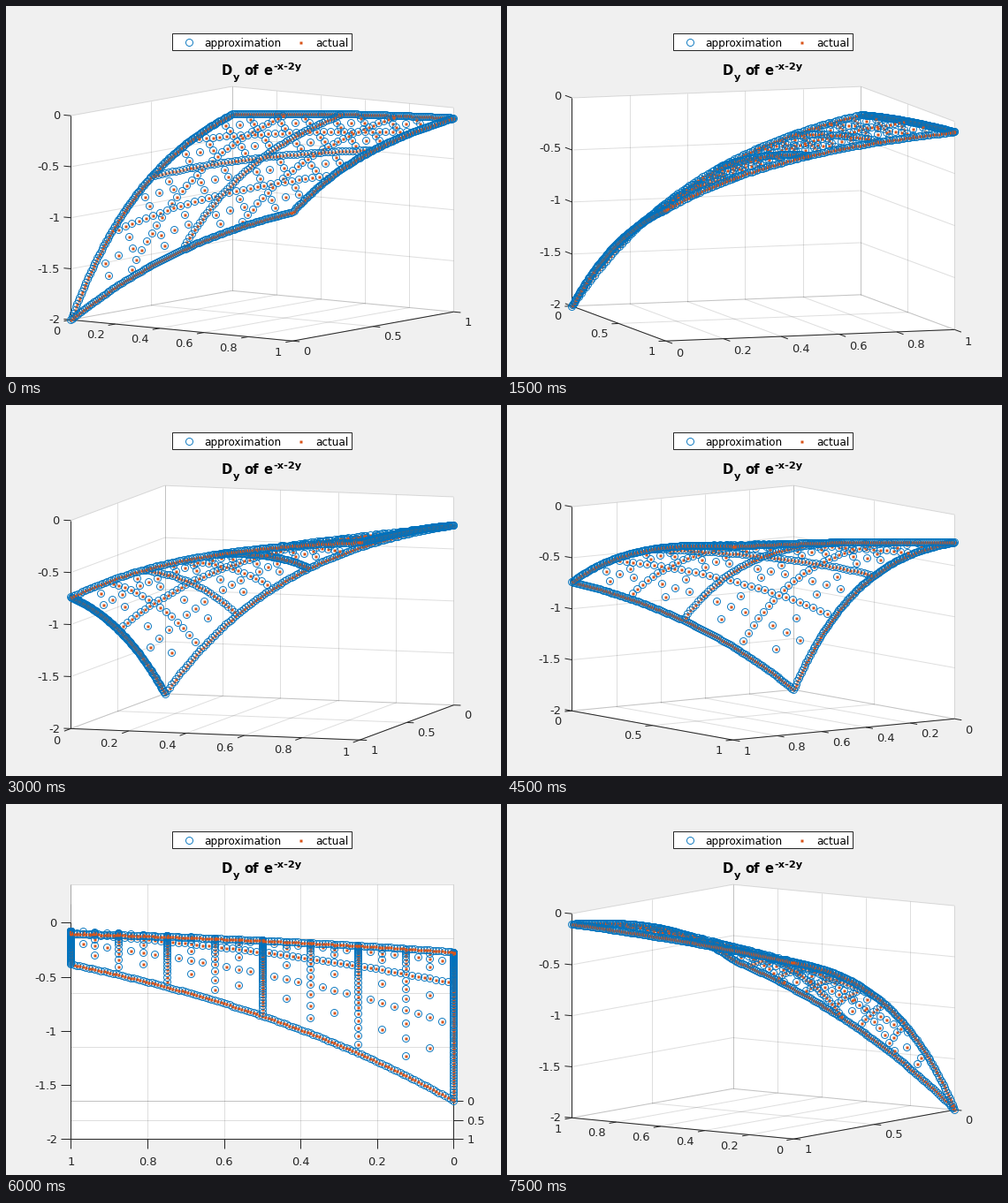
A matplotlib script for the animation above (8 s loop, 560x420 px).

```python
import numpy as np
import matplotlib.pyplot as plt
from matplotlib.animation import FuncAnimation
from matplotlib.collections import LineCollection
from matplotlib.patches import Polygon, Rectangle
from matplotlib.path import Path

W, H, DPI = 560, 420, 100
PX = 72 / DPI                       # points per pixel
BLUE, ORANGE, INK = "#0072BD", "#D95319", "#262626"
LEFT, RIGHT, TOP, BOTTOM = 73.35, 506.4, 91.2, 379.2
ELEV = np.radians(10)
TURN = 36                           # degrees per view
LEVEL = 7                           # sparse grid level
CORNERS = np.array([(0, 0), (1, 0), (1, 1), (0, 1)], float)
RING = Path.circle((0, 0), 4)
DOT = Path([(-1.5, -1.5), (1.5, -1.5), (1.5, 1.5), (-1.5, 1.5), (-1.5, -1.5)])

plt.rcParams["font.family"] = "DejaVu Sans"
fig = plt.figure(figsize=(W / DPI, H / DPI), dpi=DPI, facecolor="#F0F0F0")
ax = fig.add_axes([0, 0, 1, 1])


def sparse_grid(level):
    """Union of dyadic grids whose two levels add up to `level`."""
    pts = set()
    for a in range(level + 1):
        nx, ny = 2 ** a, 2 ** (level - a)
        pts |= {(i / nx, j / ny) for i in range(nx + 1) for j in range(ny + 1)}
    return np.array(sorted(pts))


XY = sparse_grid(LEVEL)
Z = -2 * np.exp(-XY[:, 0] - 2 * XY[:, 1])


class View:
    """Orthographic view of the unit box, stretched to fill the plot area."""

    def __init__(self, azimuth):
        a = np.radians(azimuth)
        self.right = np.array([np.cos(a), np.sin(a)])
        self.into = np.array([-np.sin(a), np.cos(a)])
        span = np.abs(self.right).sum()
        slope = span * np.tan(ELEV)
        self.sx = (RIGHT - LEFT) / span
        self.tall = (BOTTOM - TOP) / (1 + slope)
        self.sy = self.tall * np.tan(ELEV)
        self.x0 = (CORNERS @ self.right).min()
        self.d0 = (CORNERS @ self.into).min()
        order = (np.arange(4) + azimuth // 90) % 4
        self.left, self.front, self.far_right, self.back = CORNERS[order]

    def depth(self, xy):
        return np.round(np.asarray(xy) @ self.into, 6)

    def __call__(self, xy, z):
        xy = np.asarray(xy)
        x = LEFT + (xy @ self.right - self.x0) * self.sx
        y = BOTTOM - (xy @ self.into - self.d0) * self.sy
        return np.stack([x, y - (np.asarray(z) / 2 + 1) * self.tall], axis=-1)


def label(x, y, s, size=13, **kw):
    opts = dict(ha="left", va="baseline", color=INK)
    opts.update(kw)
    ax.text(x, y, s, fontsize=size * PX, **opts)


def lines(segs, color, alpha=1):
    ax.add_collection(LineCollection(segs, colors=color, alpha=alpha,
                                     linewidths=PX, capstyle="butt"))


def markers(pts, is_ring):
    """Rings and dots in drawing order, centred on whole pixels."""
    pts = np.floor(pts + 0.5) + 0.5
    clear = (0, 0, 0, 0)
    marks = ax.scatter(pts[:, 0], pts[:, 1], s=PX ** 2, linewidths=0.9 * PX,
                       facecolors=[clear if r else ORANGE for r in is_ring],
                       edgecolors=[BLUE if r else clear for r in is_ring],
                       zorder=3)
    marks.set_paths([RING if r else DOT for r in is_ring])


def ticks_between(p, q, view):
    """Tick fractions along a floor edge; short edges get fewer."""
    wide = abs((q - p) @ view.right) * view.sx > 200
    return np.linspace(0, 1, 6 if wide else 3)


def fmt(v):
    return f"{abs(v) if abs(v) < 1e-9 else v:.1f}".replace(".0", "")


def draw_header():
    ax.add_patch(Rectangle((188, 31), 203, 19, fc="white", ec=INK, lw=PX))
    markers(np.array([(207, 40.6), (333, 40.6)]), np.array([True, False]))
    label(224.4, 45.6, "approximation", 12, color="black")
    label(350.2, 45.6, "actual", 12, color="black")
    bold = dict(weight="bold", color="black")
    label(243.6, 78, "D", 14.8, **bold)
    label(257, 84, "y", 11.5, **bold)
    label(269.3, 78, "of", 14.8, **bold)
    label(291.8, 78, "e", 14.8, **bold)
    label(302.4, 72, "-x-2y", 11.4, **bold)


def draw_box(view):
    lf, fr, rt, bk = view.left, view.front, view.far_right, view.back
    outline = [view(lf, -2), view(fr, -2), view(rt, -2),
               view(rt, 0), view(bk, 0), view(lf, 0)]
    ax.add_patch(Polygon(outline, fc="white", ec="none"))

    grid = []
    for p, q, wall in ((lf, fr, bk - lf), (fr, rt, lf - fr)):
        for t in ticks_between(p, q, view):
            a = p + t * (q - p)
            b = a + wall
            grid.append([view(a, -2), view(b, -2)])
            # the parallel wall stands behind this edge
            grid.append([view(b, -2), view(b, 0)])
    for z in np.linspace(-2, 0, 5):
        grid.append([view(lf, z), view(bk, z)])
        grid.append([view(bk, z), view(rt, z)])
    lines(grid, INK, 0.15)
    lines([[view(lf, 0), view(lf, -2)], [view(lf, -2), view(fr, -2)],
           [view(fr, -2), view(rt, -2)]], INK)


def draw_ticks(view):
    lf, fr, rt = view.left, view.front, view.far_right
    flat = abs(view.right[0] * view.right[1]) < 1e-9
    size = 11 if flat else 8

    def toward(p, q):
        v = view(q, -2) - view(p, -2)
        return size * v / np.hypot(*v)

    segs = []
    for p, q, step, side in ((lf, fr, toward(rt, fr), -1),
                             (fr, rt, toward(lf, fr), 1)):
        axis = int(np.argmax(np.abs(q - p)))
        for t in ticks_between(p, q, view):
            at = p + t * (q - p)
            start = view(at, -2)
            end = start + step
            segs.append([start, end])
            name = fmt(at[axis])
            if not flat:
                label(end[0] + 4 * side, end[1] + 10, name,
                      ha="right" if side < 0 else "left", va="center_baseline")
            elif side < 0:
                label(end[0], end[1] + 14, name, ha="center", va="center_baseline")
            else:
                label(end[0] + 4, end[1], name, va="center_baseline")
    for z in np.linspace(-2, 0, 5):
        start = view(lf, z)
        end = start + toward(fr, lf)
        segs.append([start, end])
        label(end[0] - 4.5, end[1], fmt(z), ha="right", va="center_baseline")
    lines(segs, INK)


def draw_points(view):
    pts = np.tile(view(XY, Z), (2, 1))
    ring = np.repeat([True, False], len(XY))
    far_first = np.argsort(-np.tile(view.depth(XY), 2), kind="stable")
    markers(pts[far_first], ring[far_first])


def draw(i):
    ax.cla()
    ax.set(xlim=(0, W), ylim=(H, 0))
    ax.axis("off")
    view = View(TURN * (1 + i // 3))
    draw_header()
    draw_box(view)
    draw_ticks(view)
    draw_points(view)
    return []


anim = FuncAnimation(fig, draw, frames=16, interval=500, init_func=lambda: [],
                     repeat=True, repeat_delay=0, blit=False)
plt.show()
```
